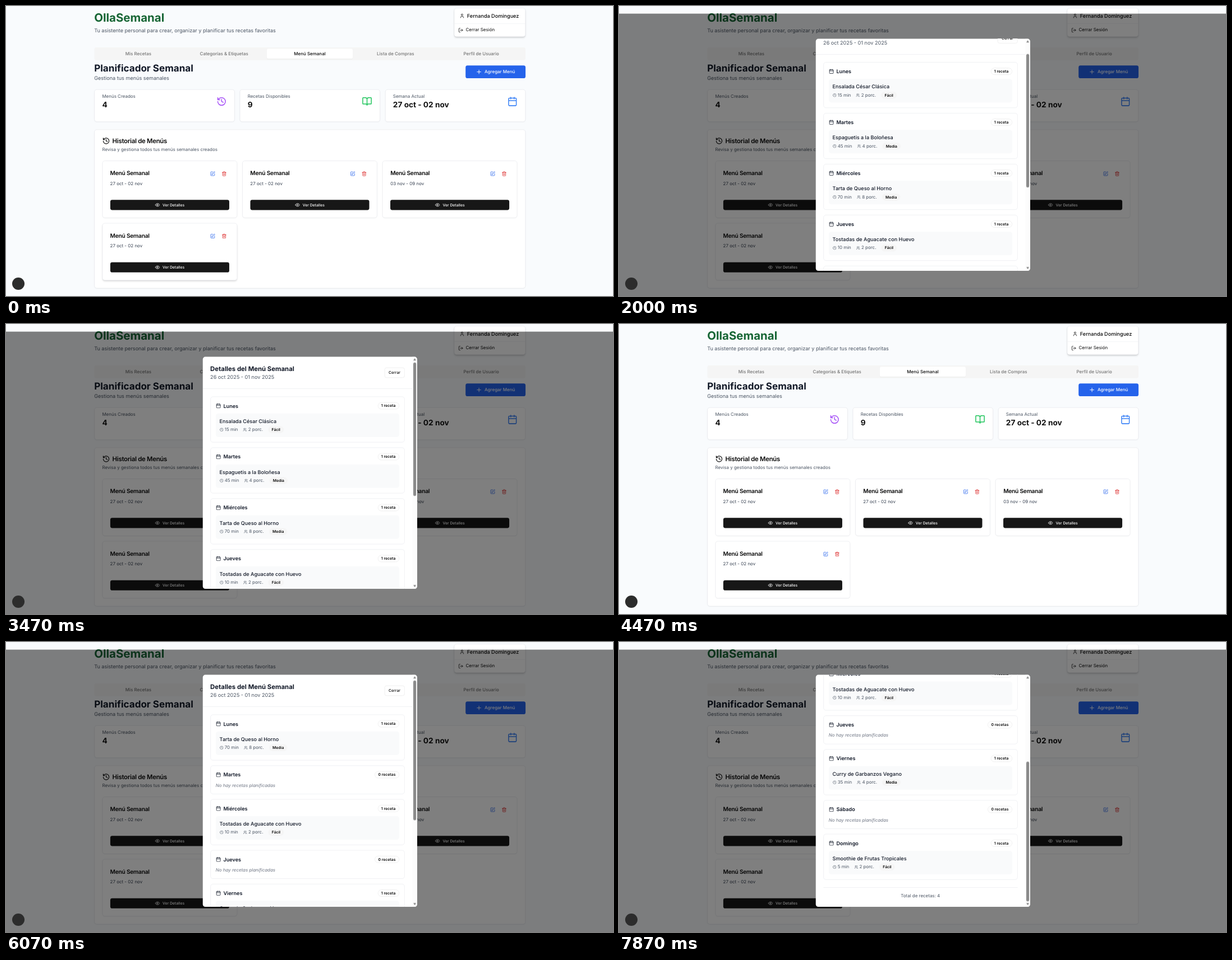
An HTML page that plays this animation: 1082x518 px, repeating every 8000 ms.

```html
<!DOCTYPE html>
<html lang="es">
<head>
<meta charset="utf-8">
<title>Planificador Semanal</title>
<style>
* { box-sizing: border-box; margin: 0; padding: 0; }
html, body { width: 1082px; height: 518px; overflow: hidden; background: #f9fbfd; }
body {
  position: relative; color: #0a0a0a;
  font: 400 16px/24px Inter, "Open Sans", sans-serif;
  text-rendering: geometricPrecision; white-space: nowrap;
}
/* The page is laid out at desktop size and scaled down to the stage. */
.page {
  position: absolute; left: 0; top: 0; width: 1905px; height: 912px;
  transform: scale(.5685); transform-origin: 0 0;
}
.abs { position: absolute; }
svg { display: block; flex: none; fill: none; stroke: currentColor; stroke-width: 2; stroke-linecap: round; stroke-linejoin: round; }
.row { display: flex; align-items: center; }
.sm { font-size: 14px; line-height: 20px; }
.dim { color: #4b5563; }

h1 { font-size: 36px; line-height: 40px; color: #166534; }
h2 { font-size: 30px; line-height: 36px; color: #111827; }
.box { position: absolute; background: #fff; border: 1px solid #e2e5ea; border-radius: 8px; box-shadow: 0 1px 3px rgba(0,0,0,.06); }

.user { left: 1404.5px; top: 6px; width: 224px; height: 91px; box-shadow: 0 4px 6px -1px rgba(0,0,0,.14), 0 2px 4px -2px rgba(0,0,0,.14); }
.user .row { gap: 8px; }
.name { height: 49px; padding: 0 16px; font-weight: 500; border-bottom: 1px solid #eceef1; }
.exit { height: 40px; padding: 0 12px; }

.tabs { left: 276.5px; top: 129.5px; width: 1352px; height: 40px; padding: 4px; display: flex; background: #f5f5f5; border-radius: 6px; }
.tabs div { flex: 1; text-align: center; font: 500 14px/32px Inter, sans-serif; color: #737373; border-radius: 4px; }
.tabs .on { background: #fff; color: #0a0a0a; box-shadow: 0 1px 2px rgba(0,0,0,.06); }

.add { left: 1440.5px; top: 187px; width: 188px; height: 40px; padding-left: 32px; gap: 8px; background: #2563eb; color: #fff; font-weight: 500; border-radius: 6px; }

.stat { top: 262px; width: 440px; height: 102px; padding: 11px 24px; }
.stat b { display: block; font-size: 24px; line-height: 32px; color: #111; }
.stat svg { position: absolute; right: 24px; top: 21px; }

.past { left: 276.5px; top: 388px; width: 1352px; height: 499px; }
.past h3 { left: 24px; top: 21px; height: 28px; gap: 8px; font-size: 20px; font-weight: 600; letter-spacing: -.025em; }

.menu { width: 423.33px; height: 180px; box-shadow: 0 1px 2px rgba(0,0,0,.05); }
.menu h4 { left: 24px; top: 26px; font-size: 18px; line-height: 28px; font-weight: 600; letter-spacing: -.025em; }
.menu .date { left: 24px; top: 62px; color: #374151; }
.edit { right: 44px; top: 32px; color: #2563eb; }
.bin { right: 8px; top: 32px; color: #dc2626; }
.menu .edit { right: 43px; }
.menu .bin { right: 32px; }
.menu .edit { right: 68px; }
.view { left: 24px; right: 24px; top: 122px; height: 32px; justify-content: center; gap: 8px; background: #171717; color: #fff; font-size: 12px; font-weight: 500; border-radius: 6px; }

.veil { left: 0; top: 24px; width: 1905px; height: 888px; background: rgba(0,0,0,.5); visibility: hidden; }
.modal { left: 616.5px; width: 672px; background: #fff; border-radius: 8px; overflow: hidden; visibility: hidden; }
.wait { top: 313px; height: 309px; }
.full { top: 103px; height: 729px; }
.head { height: 101px; padding: 0 24px; justify-content: space-between; border-bottom: 1px solid #e5e7eb; }
.head h3 { font-size: 20px; line-height: 28px; color: #111827; }
.close { height: 32px; padding: 0 12px; font: 500 12px/30px Inter, sans-serif; background: #fff; border: 1px solid #e5e5e5; border-radius: 6px; }
.spin { left: 320px; top: 173px; width: 32px; height: 32px; border-radius: 50%; border-bottom: 2px solid #2563eb; animation: spin 1s linear -.2s infinite; }
.wait p { left: 0; width: 100%; top: 213px; text-align: center; }

.body { width: 657px; }
.days { padding: 24px; }
.day { padding: 16px; margin-bottom: 16px; border: 1px solid #e5e7eb; border-radius: 8px; }
.top { height: 24px; margin-bottom: 12px; gap: 8px; font-weight: 600; color: #111827; }
.top svg { color: #3b82f6; }
.tag { height: 22px; padding: 0 10px; border: 1px solid #e5e5e5; border-radius: 11px; font: 600 12px/20px Inter, sans-serif; color: #0a0a0a; }
.top .tag { margin-left: auto; }
.dish { height: 74px; padding: 12px; background: #f9fafb; border-radius: 8px; font-weight: 500; color: #111827; }
.info { height: 22px; margin-top: 4px; gap: 16px; font-weight: 400; }
.info .row { gap: 4px; }
.info .tag { background: #f5f5f5; border-color: #f5f5f5; }
.none { font-style: italic; color: #6b7280; }
.sum { margin-top: 24px; padding-top: 16px; border-top: 1px solid #e5e7eb; text-align: center; }
.bar { right: 0; top: 0; width: 15px; height: 729px; background: #fcfcfc; }
.bar svg { left: 3px; width: 9px; height: 7px; fill: #7d7d7d; stroke: none; }
.thumb { left: 3px; top: 17.5px; width: 9px; background: #8b8b8b; border-radius: 4.5px; }

.badge { left: 10.5px; top: 485.2px; width: 22px; height: 22px; border-radius: 50%; background: #2c2c2c; }

/* Timeline: one 8 s loop, 1 % = 80 ms */
.veil { animation: veil 8s step-end infinite; }
.wait { animation: wait 8s step-end infinite; }
.m1 { animation: open1 8s step-end infinite; }
.m2 { animation: open2 8s step-end infinite; }
.m1 .body, .m1 .thumb { animation: roll1 8s linear infinite; }
.m2 .body, .m2 .thumb { animation: roll2 8s linear infinite; }
.m1 .close { animation: press 8s step-end infinite; }
.c0 { animation: lift0 8s linear infinite; }
.c0 .view { animation: glow0 8s linear infinite; }
.c1 { animation: lift1 8s step-end infinite; }
.c1 .view { animation: glow1 8s linear infinite; }
.c3 { animation: lift3 8s linear infinite; }

.page { --flat: 0 1px 2px 0 rgba(0,0,0,.05), 0 0 0 0 rgba(0,0,0,0); --high: 0 4px 6px -1px rgba(0,0,0,.12), 0 2px 4px -2px rgba(0,0,0,.12); }
@keyframes spin { to { transform: rotate(360deg); } }
@keyframes veil { 0%, 55.875% { visibility: hidden; } 15%, 75.875% { visibility: visible; } 100% { visibility: visible; } }
@keyframes wait { 0%, 17.5%, 100% { visibility: hidden; } 15% { visibility: visible; } }
@keyframes open1 { 0%, 55.875%, 100% { visibility: hidden; } 17.5% { visibility: visible; } }
@keyframes open2 { 0% { visibility: hidden; } 75.875%, 100% { visibility: visible; } }
@keyframes press { 0%, 55.875%, 100% { background: #fff; } 54.125% { background: #f5f5f5; } }
@keyframes roll1 {
  0%, 24.3% { transform: none; animation-timing-function: cubic-bezier(.35,.15,.55,1); }
  29.125%, 38.4% { transform: translateY(var(--go)); animation-timing-function: cubic-bezier(.35,.15,.55,1); }
  43.375%, 100% { transform: none; }
}
@keyframes roll2 {
  0%, 90.2% { transform: none; animation-timing-function: cubic-bezier(.35,.2,.6,1); }
  98.375%, 100% { transform: translateY(var(--go)); }
}
@keyframes lift0 { 0%, 6.6% { box-shadow: var(--flat); } 9%, 17.4% { box-shadow: var(--high); } 17.5%, 100% { box-shadow: var(--flat); } }
@keyframes glow0 { 0%, 7.6% { background: #171717; } 10%, 17.4% { background: #343434; } 17.5%, 100% { background: #171717; } }
@keyframes lift1 { 0% { box-shadow: var(--flat); } 65.875%, 100% { box-shadow: var(--high); } }
@keyframes glow1 { 0%, 68.4% { background: #171717; } 70.875%, 100% { background: #2e2e2e; } }
@keyframes lift3 { 0%, 6.2% { box-shadow: var(--high); } 8.5%, 100% { box-shadow: var(--flat); } }
</style>
</head>
<body>
<div class="page" id="page"></div>
<div class="abs badge"></div>
<script>
const ring = (x, y, r) => `M${x - r} ${y}a${r} ${r} 0 1 0 ${2 * r} 0a${r} ${r} 0 1 0 ${-2 * r} 0`;
const paths = {
  user: 'M19 21v-2a4 4 0 0 0-4-4H9a4 4 0 0 0-4 4v2' + ring(12, 7, 4),
  exit: 'M9 21H5a2 2 0 0 1-2-2V5a2 2 0 0 1 2-2h4M16 17l5-5-5-5M21 12H9',
  plus: 'M5 12h14M12 5v14',
  history: 'M3 12a9 9 0 1 0 9-9 9.75 9.75 0 0 0-6.74 2.74L3 8M3 3v5h5M12 7v5l4 2',
  book: 'M12 7v14M3 18a1 1 0 0 1-1-1V4a1 1 0 0 1 1-1h5a4 4 0 0 1 4 4 4 4 0 0 1 4-4h5a1 1 0 0 1 1 1v13a1 1 0 0 1-1 1h-6a3 3 0 0 0-3 3 3 3 0 0 0-3-3z',
  calendar: 'M8 2v4M16 2v4M5 4h14a2 2 0 0 1 2 2v14a2 2 0 0 1-2 2H5a2 2 0 0 1-2-2V6a2 2 0 0 1 2-2zM3 10h18',
  edit: 'M12 3H5a2 2 0 0 0-2 2v14a2 2 0 0 0 2 2h14a2 2 0 0 0 2-2v-7M18.4 2.6a2.1 2.1 0 0 1 3 3L12 15l-4 1 1-4z',
  bin: 'M3 6h18M19 6v14a2 2 0 0 1-2 2H7a2 2 0 0 1-2-2V6M8 6V4a2 2 0 0 1 2-2h4a2 2 0 0 1 2 2v2M10 11v6M14 11v6',
  eye: 'M2 12a10.75 10.75 0 0 1 20 0 10.75 10.75 0 0 1-20 0z' + ring(12, 12, 3),
  clock: ring(12, 12, 10) + 'M12 6v6l4 2',
  users: 'M16 21v-2a4 4 0 0 0-4-4H6a4 4 0 0 0-4 4v2M22 21v-2a4 4 0 0 0-3-3.87M16 3.13a4 4 0 0 1 0 7.75' + ring(9, 7, 4)
};
const icon = (name, size = 16, color = 'currentColor') =>
  `<svg width="${size}" height="${size}" viewBox="0 0 24 24" style="color:${color}"><path d="${paths[name]}"/></svg>`;

const tabs = ['Mis Recetas', 'Categorías &amp; Etiquetas', 'Menú Semanal', 'Lista de Compras', 'Perfil de Usuario']
  .map((t, i) => `<div class="${i === 2 ? 'on' : ''}">${t}</div>`).join('');

const stats = [
  ['Menús Creados', '4', 'history', '#a855f7'],
  ['Recetas Disponibles', '9', 'book', '#22c55e'],
  ['Semana Actual', '27 oct - 02 nov', 'calendar', '#3b82f6']
].map(([label, value, pic, color], i) => `
  <div class="box stat" style="left:${276.5 + 456 * i}px">
    <p class="sm dim">${label}</p><b>${value}</b>${icon(pic, 32, color)}
  </div>`).join('');

const menus = ['27 oct - 02 nov', '27 oct - 02 nov', '03 nov - 09 nov', '27 oct - 02 nov'].map((date, i) => `
  <div class="box menu c${i}" style="left:${301.5 + 439.33 * (i % 3)}px;top:${i < 3 ? 486 : 682}px">
    <h4 class="abs">Menú Semanal</h4>
    <div class="abs edit">${icon('edit')}</div><div class="abs bin">${icon('bin')}</div>
    <p class="abs date sm">${date}</p>
    <div class="abs row view">${icon('eye')}Ver Detalles</div>
  </div>`).join('');

const head = `
  <div class="row head">
    <div><h3>Detalles del Menú Semanal</h3><p class="dim">26 oct 2025 - 01 nov 2025</p></div>
    <div class="close">Cerrar</div>
  </div>`;

const dishes = {
  salad: ['Ensalada César Clásica', 15, 2, 'Fácil'],
  pasta: ['Espaguetis a la Boloñesa', 45, 4, 'Media'],
  cake: ['Tarta de Queso al Horno', 70, 8, 'Media'],
  toast: ['Tostadas de Aguacate con Huevo', 10, 2, 'Fácil'],
  curry: ['Curry de Garbanzos Vegano', 35, 4, 'Media'],
  shake: ['Smoothie de Frutas Tropicales', 5, 2, 'Fácil']
};
const week = ['Lunes', 'Martes', 'Miércoles', 'Jueves', 'Viernes', 'Sábado', 'Domingo'];

const dish = ([title, min, people, level]) => `
  <div class="dish">${title}
    <div class="row info sm dim">
      <span class="row">${icon('clock', 12)}${min} min</span>
      <span class="row">${icon('users', 12)}${people} porc.</span>
      <span class="tag">${level}</span>
    </div>
  </div>`;

const day = (name, i, plan) => `
  <div class="day"${i === 6 ? ' style="margin:0"' : ''}>
    <div class="row top">${icon('calendar')}${name}<span class="tag">${plan[i] ? '1 receta' : '0 recetas'}</span></div>
    ${plan[i] ? dish(dishes[plan[i]]) : '<p class="none sm">No hay recetas planificadas</p>'}
  </div>`;

// Scroll range follows from the content height; the thumb moves in proportion.
function detail(cls, plan) {
  const view = 729, track = 694, count = plan.filter(Boolean).length;
  const total = 306 + count * 144 + (7 - count) * 90;
  const range = total - view, thumb = track * view / total;
  return `
  <div class="abs modal full ${cls}">
    <div class="body" style="--go:${-range}px">${head}
      <div class="days">
        ${week.map((name, i) => day(name, i, plan)).join('')}
        <p class="sum sm dim">Total de recetas: ${count}</p>
      </div>
    </div>
    <div class="abs bar">
      <svg class="abs" style="top:5px" viewBox="0 0 9 7"><path d="M0 7 4.5 0 9 7z"/></svg>
      <svg class="abs" style="bottom:5px" viewBox="0 0 9 7"><path d="M0 0h9L4.5 7z"/></svg>
      <div class="abs thumb" style="height:${thumb}px;--go:${track - thumb}px"></div>
    </div>
  </div>`;
}

document.getElementById('page').innerHTML = `
  <h1 class="abs" style="left:276.5px;top:16px">OllaSemanal</h1>
  <p class="abs dim" style="left:276.5px;top:64px">Tu asistente personal para crear, organizar y planificar tus recetas favoritas</p>
  <div class="box user">
    <div class="row name">${icon('user')}Fernanda Dominguez</div>
    <div class="row exit sm">${icon('exit')}Cerrar Sesión</div>
  </div>
  <div class="abs tabs">${tabs}</div>
  <h2 class="abs" style="left:276.5px;top:178px">Planificador Semanal</h2>
  <p class="abs dim" style="left:276.5px;top:214px">Gestiona tus menús semanales</p>
  <div class="abs row add sm">${icon('plus', 20)}Agregar Menú</div>
  ${stats}
  <div class="box past">
    <h3 class="abs row">${icon('history', 24)}Historial de Menús</h3>
    <p class="abs sm dim" style="left:24px;top:53px">Revisa y gestiona todos tus menús semanales creados</p>
  </div>
  ${menus}
  <div class="abs veil"></div>
  <div class="abs modal wait">${head}
    <div class="abs spin"></div><p class="abs dim">Cargando detalles del menú...</p>
  </div>
  ${detail('m1', ['salad', 'pasta', 'cake', 'toast', '', '', 'shake'])}
  ${detail('m2', ['cake', '', 'toast', '', 'curry', '', 'shake'])}`;
</script>
</body>
</html>
```
